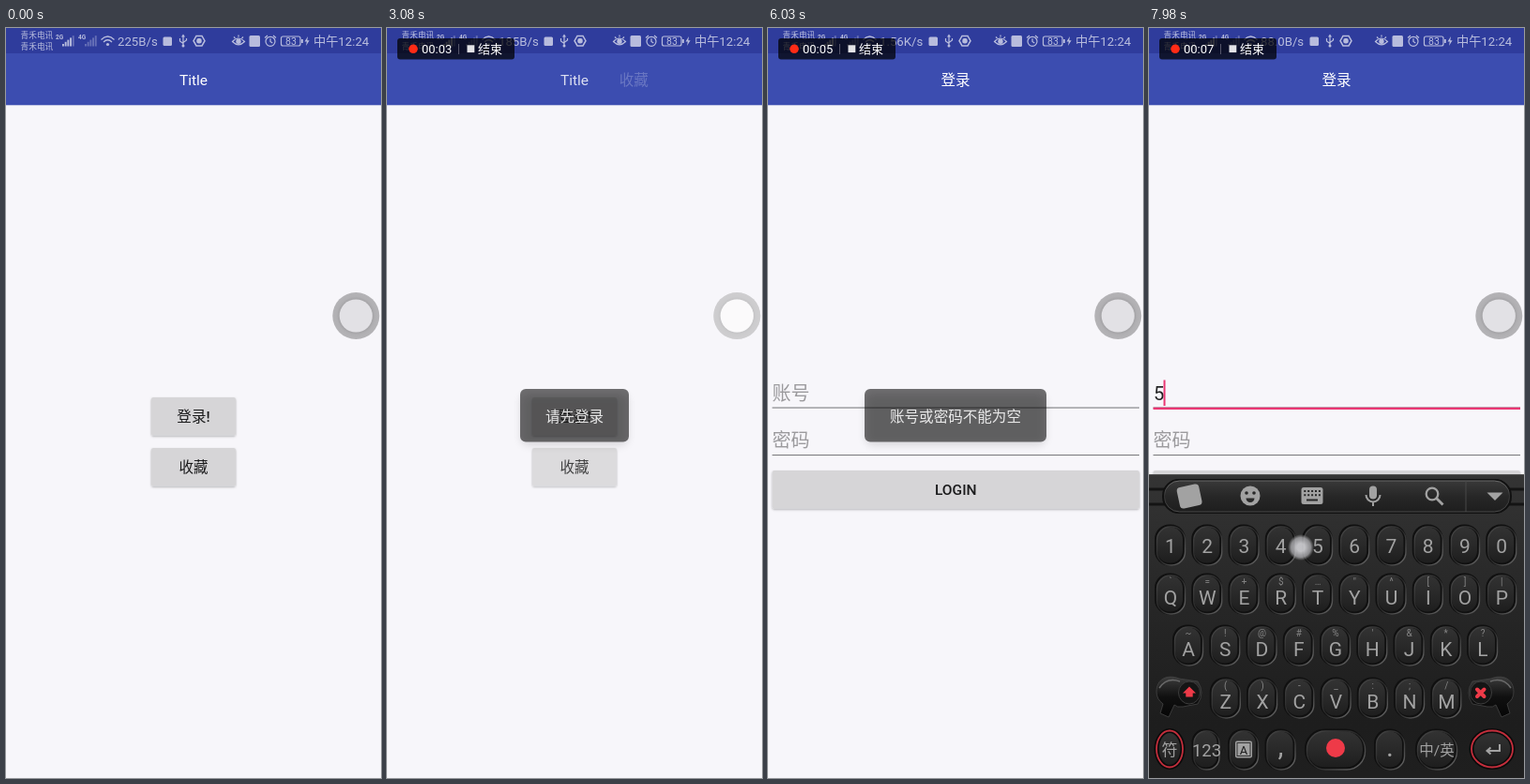
Write an HTML page that moves like this. It is 400 px wide and 800 px high and loops after 8 s.

```html
<!DOCTYPE html>
<html lang="zh-CN">
<head>
<meta charset="utf-8">
<title>Login demo</title>
<style>
html, body { margin: 0; width: 100%; height: 100%; overflow: hidden; background: #f7f6fa; }
svg { display: block; width: 400px; height: 800px; }
text { font-family: Roboto, "Noto Sans CJK SC", "Noto Sans CJK", sans-serif; font-size: 15.56px; white-space: pre; }
.mid text, text.mid { text-anchor: middle; }
.bold { font-weight: 500; fill: #1b1b1c; }
.bar { fill: #fff; }
.hint { font-size: 20px; fill: #9b9a9d; }
.status { fill: #fff; stroke: none; opacity: .66; }
.status text { font-size: 13.2px; }
.line { fill: none; stroke: #fff; stroke-width: 1.2; }
</style>
</head>
<body>
<svg viewBox="0 0 400 800" id="stage"></svg>
<script>
const LOOP = 8000;
const stage = document.getElementById('stage');
const range = n => [...Array(n).keys()];

const rect = (x, y, w, h, r, fill, more = '') =>
  `<rect x="${x}" y="${y}" width="${w}" height="${h}" rx="${r}" fill="${fill}" ${more}/>`;
const circle = (x, y, r, fill, more = '') =>
  `<circle cx="${x}" cy="${y}" r="${r}" fill="${fill}" ${more}/>`;
const path = (d, more = '') => `<path d="${d}" ${more}/>`;
const text = (x, y, s, more = '') => `<text x="${x}" y="${y}" ${more}>${s}</text>`;
const group = (id, body, more = '') => `<g id="${id}" ${more}>${body}</g>`;
const grad = (id, x2, ...stops) => `<linearGradient id="${id}" x2="${x2}" y2="1">` +
  stops.map((c, i) => `<stop offset="${i / (stops.length - 1)}" stop-color="${c}"/>`).join('') +
  '</linearGradient>';

const defs = `<defs>
  ${grad('board', 0, '#343434', '#272727', '#1d1d1d', '#222222')}
  ${grad('key', 0, '#333333', '#292929', '#1d1d1d')}
  ${grad('rim', 1, '#4a4a4a', '#262626', '#6c6c6c')}
  ${grad('panel', 0, '#3a3a3a', '#272727', '#1d1d1d')}
  ${grad('edge', 0, '#6a6a6a', '#333333', '#4b4b4b')}
  ${grad('bud', 0, '#3c3c3c', '#101010', '#060606')}
  <radialGradient id="tip"><stop offset=".3" stop-color="#d6d6da" stop-opacity=".88"/>
    <stop offset=".75" stop-color="#b8b8bc" stop-opacity=".7"/>
    <stop offset="1" stop-color="#aaa" stop-opacity="0"/></radialGradient>
  <radialGradient id="ring"><stop offset=".7" stop-color="#a4a3a6"/>
    <stop offset=".82" stop-color="#b1b0b3"/><stop offset="1" stop-color="#b4b3b6"/></radialGradient>
  <filter id="drop" x="-10%" y="-20%" width="120%" height="160%">
    <feDropShadow dx="0" dy="1.2" stdDeviation="1.1" flood-opacity=".3"/></filter>
  <filter id="blur" x="-20%" y="-40%" width="140%" height="180%">
    <feGaussianBlur stdDeviation="5"/></filter>
</defs>`;

// Status bar
function statusBar() {
  const bars = (x, lit) => range(5).map(i =>
    rect(x + i * 2.7, 17 - i * 2.2, 1.9, 2.5 + i * 2.2, 0, '#fff', `opacity="${i < lit ? 1 : .4}"`)).join('');
  const carrier = [11, 23].map(y => text(15.5, y, '青禾电讯', 'style="font-size:8.7px"')).join('');
  const tag = (x, s) => text(x, 12, s, 'style="font-size:6.5px;font-weight:700"');
  const wifi = [[101.5, 12.5, 7], [104, 15, 4.5]].map(([x, y, r]) =>
    path(`M${x} ${y}Q108.5 ${y - r} ${217 - x} ${y}`, 'class="line"')).join('') + circle(108.5, 17.5, 1.6, '#fff');
  const icons = rect(167.5, 9.5, 9.5, 9.5, 1.5, '#fff') +
    path('M189 8V19M185.5 11V14L189 16.5M192.5 11V13L189 15.5', 'class="line"') +
    circle(189, 19, 1.5, '#fff') + path('M189 6.5l2 3h-4z') +
    path('M203 8.5h6l3 5.2-3 5.2h-6l-3-5.2z', 'class="line" style="stroke-width:1.5"') +
    rect(203.3, 11, 5.4, 5.5, 2, '#fff');
  const right = path('M241.5 14.5Q248 7.5 254.5 14.5Q248 21 241.5 14.5zM243 9.5l1.5 1.5M248 7.5v2M253 9.5l-1.5 1.5', 'class="line"') +
    circle(248, 14.3, 2.7, '#fff') + rect(259.5, 8, 11.5, 12, 1.5, '#fff') +
    circle(282, 14.3, 5, 'none', 'class="line"') +
    path('M282 11.3V14.5L284.3 16M276 10.5L279 8M288 10.5L285 8', 'class="line"') +
    rect(293.5, 9, 20.5, 10, 2, 'none', 'class="line"') + rect(315, 12, 1.8, 4, 0, '#fff') +
    text(304, 18, '83', 'class="mid" style="font-size:10.5px"') +
    path('M322 9l-3.5 5.5h2.3L320 19l3.6-5.8h-2.3z') + text(328, 18.7, '中午12:24');
  return rect(0, 0, 400, 27, 0, '#2f3c9c') + `<g class="status">${carrier}${tag(53, '2G')}${bars(60, 4)}` +
    `${tag(77, '4G')}${bars(84, 0)}${wifi}<text id="speed" x="119" y="18.5"></text>${group('shift', icons)}${right}</g>`;
}

const button = (x, y, w, label, id) =>
  rect(x, y, w, 40.5, 2, '#d6d5d7', 'filter="url(#drop)"') +
  rect(x, y, w, 40.5, 2, '#000', `id="${id}" opacity="0"`) +
  text(x + w / 2, y + 26, label, 'class="mid bold"');
const title = s => text(200, 61, s, 'class="mid bar"');

const home = title('Title') + button(155, 394, 90, '登录!', 'press1') + button(155, 448, 90, '收藏', 'press2');
const login = title('登录') +
  text(4.5, 397, '账号', 'class="hint" id="hint"') + text(5, 397, '5', 'class="hint" id="typed" style="fill:#222"') +
  rect(4.5, 404.5, 391.5, 1.1, 0, '#7d7d80') + rect(4.5, 404.7, 391.5, 2.3, 0, '#ea3673', 'id="focus"') +
  rect(0, 375.5, 2, 27.5, 0, '#ea3673', 'id="caret"') +
  text(4.5, 447, '密码', 'class="hint"') + rect(4.5, 455, 391.5, 1.1, 0, '#7d7d80') +
  button(4.5, 472, 391.5, 'LOGIN', 'press3');

const toast = (x, w, s) => rect(x + 1, 391, w - 2, 54, 8, '#000', 'filter="url(#blur)" opacity=".13"') +
  rect(x, 385, w, 56.5, 6, '#000', 'opacity=".555"') +
  text(200, 419.5, s, 'class="mid" fill="#fff" fill-opacity=".86"');

// Keyboard
function keyboard() {
  const ink = '#a2a2a2', red = '#ee3a48';
  const cap = (x, y, w = 30, h = 41) => {
    const r = Math.min(w, h) / 2.1;
    return rect(x - w / 2 - .5, y - h / 2 - .5, w, h, r, 'url(#key)', 'stroke="#101010" stroke-width="3"') +
      rect(x - w / 2 + .5, y - h / 2 + .5, w, h, r, 'none', 'stroke="url(#rim)" stroke-width="1.4"');
  };
  const label = (x, y, s, size, fill = ink) => text(x, y, s, `fill="${fill}" style="font-size:${size}px"`);
  const row = (x0, y, keys, marks) => [...keys].map((k, i) => {
    const x = x0 + i * 39.25;
    return cap(x, y) + label(x, y + (marks ? 10.5 : 7.5), k, 21) +
      (marks ? label(x, y - 10, marks[i].replace('&', '&amp;'), 10, '#858585') : '');
  }).join('');
  const tools =
    rect(31, 488, 24, 23, 4, ink, 'transform="rotate(-12 43 499)"') +
    circle(108, 499, 10.5, ink) + circle(104, 496, 1.8, '#292929') + circle(112, 496, 1.8, '#292929') +
    path('M103.5 501.5h9a4.5 4.5 0 0 1-9 0z', 'fill="#292929"') +
    rect(162.5, 490, 23, 18, 2.5, ink) +
    range(10).map(i => rect(165.3 + i % 5 * 3.9, 493 + (i / 5 | 0) * 4.2, 2, 2, 0, '#292929')).join('') +
    rect(168, 502.5, 12, 2, 0, '#292929') +
    rect(235, 488.5, 8, 14, 4, ink) + path('M231.5 498a7.5 7.5 0 0 0 15 0M239 505.5V510', `fill="none" stroke="${ink}" stroke-width="2"`) +
    circle(302, 497, 6.3, 'none', `stroke="${ink}" stroke-width="2.3"`) +
    path('M306.5 501.5L313.5 508.5', `stroke="${ink}" stroke-width="2.8"`) +
    rect(337.5, 483, 1, 33, 0, '#484848') + path('M360.5 495.5h17l-8.5 8.5z', `fill="${ink}"`);
  const bud = path('M8 708C8 694 20 689 32 694L52 697Q60 709 52 721L36 724Q30 725 27 722L21 735L12 731L15 721Q8 716 8 708z',
      'fill="url(#bud)" stroke="#444" stroke-width=".8"') +
    path('M11 704Q19 692 33 697', 'fill="none" stroke="#6a6a6a" stroke-width="1.5"') +
    `<ellipse cx="43" cy="709" rx="11.5" ry="12" fill="#151515" stroke="#3d3d3d"/>`;
  const ring = (x, rx) => `<ellipse cx="${x}" cy="769" rx="${rx}" ry="19.5" fill="url(#key)" stroke="#0a0a0a" stroke-width="5"/>` +
    `<ellipse cx="${x}" cy="769" rx="${rx}" ry="19.5" fill="none" stroke="#c42e3c" stroke-width="1.8"/>`;
  const bottom = ring(22, 14) + label(22, 776, '符', 17) + cap(61, 770, 27) + label(61.5, 777, '123', 18.5) +
    cap(101, 770) + rect(92, 760.5, 18, 18, 2, ink) + rect(94, 762.5, 14, 14, 0, 'none', 'stroke="#333" stroke-width="1"') +
    label(101, 774.5, 'A', 13, '#222') +
    cap(140.5, 770) + label(140.5, 776, ',', 30) + cap(199, 770, 62) + circle(199, 768, 10, red) +
    cap(257, 770) + label(257, 776.5, '.', 30) + cap(307, 770, 42) + label(307, 776, '中/英', 15.5) +
    ring(366, 22) + path('M374 764v7h-13M364.5 767.5l-4 3.5 4 3.5', `fill="none" stroke="${ink}" stroke-width="2"`);
  return rect(0, 476, 400, 400, 0, 'url(#board)') + rect(0, 476, 400, 1.2, 0, '#4a4a4a') +
    path('M0 492H18M382 492H400M0 508H18M382 508H400', 'stroke="#141414" stroke-width="3"') +
    rect(15, 482, 371, 35, 17, 'url(#panel)', 'stroke="#111" stroke-width="2"') +
    rect(16.5, 483, 368, 33, 16, 'none', 'stroke="url(#edge)"') + tools +
    row(23, 552, '1234567890') + row(23, 604, 'QWERTYUIOP', '`=+$…"^[]|') +
    row(42, 659, 'ASDFGHJKL', '~!@#%\'&*?') + row(81.8, 715, 'ZXCVBNM', '()-_:;/') +
    bud + `<g transform="matrix(-1 0 0 1 397 0)">${bud}</g>` +
    path('M43 702.5l7 7h-3.3v4h-7.4v-4H36z', `fill="${red}"`) +
    path('M350 705.5l7.5 7.5M357.5 705.5l-7.5 7.5', `stroke="${red}" stroke-width="4" stroke-linecap="round"`) + bottom;
}

const ball = circle(373.3, 307, 25, 'url(#ring)') + circle(373.3, 307, 25, '#fff', 'id="glowRing" opacity="0"') +
  circle(373.3, 307, 17.6, '#e2e1e5') + circle(373.3, 307, 17.6, '#fff', 'id="glow" opacity="0"');

const recorder = rect(11, 11, 125, 22.5, 3, '#000', 'opacity=".73"') + circle(28, 22.3, 4.8, '#ff2b16', 'id="dot"') +
  `<g fill="#fff"><text id="clock" x="37" y="27" style="font-size:13px"></text>` +
  rect(76, 17, 1, 11, 0, '#55566a') + rect(85.5, 18.3, 7.8, 7.8, 0, '#e4e4e8') +
  text(97, 27.2, '结束', 'style="font-size:13px"') + '</g>';

stage.innerHTML = defs + rect(0, 0, 400, 800, 0, '#f7f6fa') + rect(0, 27, 400, 55.3, 0, '#3c4db0') +
  statusBar() +
  group('home', home) + group('fav', title('收藏')) + group('login', login) +
  group('board1', keyboard(), 'class="mid"') +
  group('toast1', toast(142, 116, '请先登录')) + group('toast2', toast(103, 194, '账号或密码不能为空')) +
  ball + circle(0, 0, 14, 'url(#tip)', 'id="touch"') + group('rec', recorder);

const el = {};
stage.querySelectorAll('[id]').forEach(n => el[n.id] = n);

// Opacity over time: [ms, value], linear between
const fades = {
  rec: [[30, 0], [220, 1]],
  home: [[1110, 1], [1370, 0], [2850, 0], [3130, 1], [4250, 1], [4515, 0]],
  fav: [[1159, 0], [1290, 1], [2850, 1], [3150, 0]],
  login: [[4310, 0], [4450, 1]],
  toast1: [[1390, 0], [1490, 1], [3400, 1], [3700, 0]],
  toast2: [[5640, 0], [5800, 1], [7420, 1], [7650, 0]],
  board1: [[7180, 0], [7260, 1]],
  press1: [[4060, 0], [4150, .12], [4400, 0]],
  press2: [[1070, 0], [1140, .12], [1360, 0]],
  press3: [[5500, 0], [5580, .12], [5900, 0]],
  glow: [[2580, 0], [2680, .85], [3150, .85], [3300, .6], [4500, .6], [4800, 0]],
  glowRing: [[2580, 0], [2680, .35], [3100, .35], [3270, 0]]
};
// Hard changes: [ms, value]
const steps = {
  dot: [[0, 1], [380, 0], [790, 1], [1250, 0], [1880, 1], [2280, 0], [2760, 1], [3390, 0], [3760, 1],
    [4240, 0], [4760, 1], [5280, 0], [5760, 1], [6410, 0], [6800, 1], [7200, 0], [7700, 1]],
  focus: [[0, 0], [6700, 1]],
  caret: [[0, 0], [6720, 1], [7500, 0], [7930, 1]],
  hint: [[0, 1], [7930, 0]],
  typed: [[0, 0], [7930, 1]]
};
const speeds = [[0, '225B/s'], [700, '185B/s'], [3700, '1.56K/s'], [6700, '88.0B/s']];
const taps = [[200, 470, 1070, 1170], [200, 416, 4060, 4180], [200, 494, 5500, 5610], [150, 390, 6560, 6680], [162, 554, 7840, 8000]];

const clamp = v => Math.min(1, Math.max(0, v));
const stepAt = (list, t) => list.filter(k => k[0] <= t).pop()[1];
function mix(list, t) {
  const i = list.findIndex(k => k[0] > t);
  if (i < 0) return list[list.length - 1][1];
  if (!i) return list[0][1];
  const [a, x] = list[i - 1], [b, y] = list[i];
  return x + (y - x) * (t - a) / (b - a);
}
const slide = (t, from, ms, dist) => dist * (1 - clamp((t - from) / ms)) ** 2;
const move = (id, x, y = 0) => el[id].setAttribute('transform', `translate(${x} ${y})`);
const show = (id, v) => el[id].setAttribute('opacity', v);

function draw(t) {
  for (const id in fades) show(id, mix(fades[id], t));
  for (const id in steps) show(id, stepAt(steps[id], t));
  move('fav', t < 2850 ? slide(t, 1159, 420, 150) : Math.min(100, (t - 2850) * .274));
  move('login', slide(t, 4325, 420, 150));
  move('board1', 0, slide(t, 7180, 170, 66));
  move('caret', t < 7930 ? 4.5 : 15.5);
  move('shift', t < 3700 ? 0 : 4);
  el.speed.textContent = stepAt(speeds, t);
  el.clock.textContent = '00:0' + Math.max(0, Math.floor((t - 60) / 1000));
  const tap = taps.find(k => t >= k[2] && t < k[3]);
  show('touch', tap ? 1 : 0);
  if (tap) move('touch', tap[0], tap[1]);
}
function frame() {
  draw(performance.now() % LOOP);
  requestAnimationFrame(frame);
}
frame();
</script>
</body>
</html>
```
